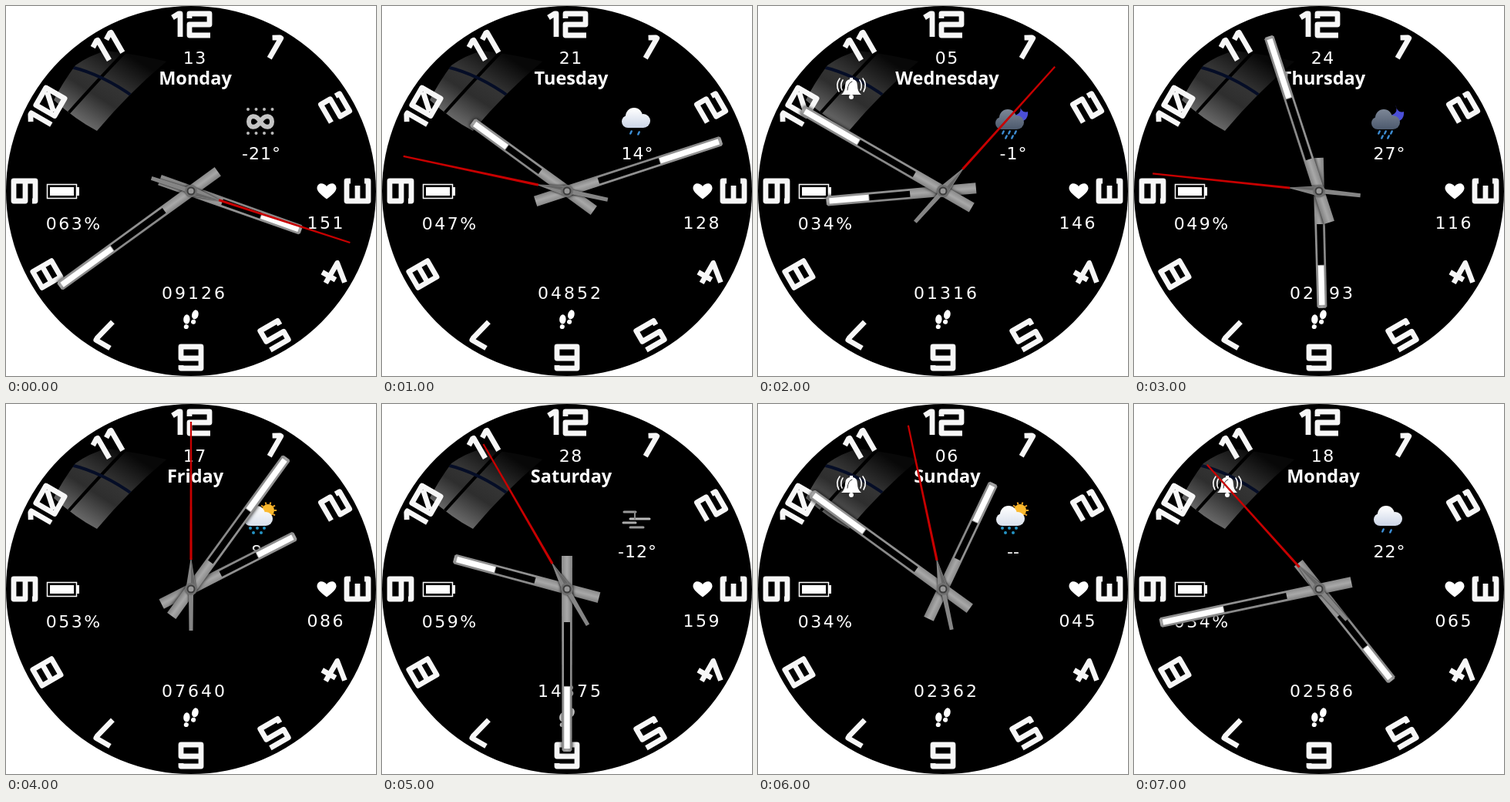
Write an HTML page with a canvas that moves like this. It is 480 px wide and 480 px high and loops after 8 s.

```html
<!DOCTYPE html>
<html lang="en">
<head>
<meta charset="utf-8">
<title>Watch face</title>
<style>
  html, body { margin: 0; width: 100%; height: 100%; overflow: hidden; background: #fff; }
  canvas { display: block; width: 480px; height: 480px; }
</style>
</head>
<body>
<canvas id="face" width="480" height="480"></canvas>
<script>
const ctx = document.getElementById('face').getContext('2d');
const TAU = Math.PI * 2;
const STEP = 1000;

const readings = [
  { day: 'Monday', date: '13', time: [3, 39, 18], battery: '063', pulse: '151', steps: '09126', temp: '-21°', sky: 'haze' },
  { day: 'Tuesday', date: '21', time: [10, 12, 47], battery: '047', pulse: '128', steps: '04852', temp: '14°', sky: 'rain' },
  { day: 'Wednesday', date: '05', time: [8, 50, 7], battery: '034', pulse: '146', steps: '01316', temp: '-1°', sky: 'nightRain', alarm: true },
  { day: 'Thursday', date: '24', time: [5, 57, 46], battery: '049', pulse: '116', steps: '02393', temp: '27°', sky: 'nightRain' },
  { day: 'Friday', date: '17', time: [2, 6, 0], battery: '053', pulse: '086', steps: '07640', temp: '8°', sky: 'sunSnow' },
  { day: 'Saturday', date: '28', time: [9, 30, 55], battery: '059', pulse: '159', steps: '14375', temp: '-12°', sky: 'fog' },
  { day: 'Sunday', date: '06', time: [0, 51, 58], battery: '034', pulse: '045', steps: '02362', temp: '--', sky: 'sunSnow', alarm: true },
  { day: 'Monday', date: '18', time: [4, 43, 53], battery: '034', pulse: '065', steps: '02586', temp: '22°', sky: 'rain', alarm: true }
];

// Square numerals as SVG paths, each about 27 by 28 units around its centre.
const numerals = {
  0: 'M-13-14H13V14H-13ZM-9 10L9-10',
  1: 'M-8-9L0-14H2V16',
  2: 'M-13-8V-14H13V0H-13V14H14',
  3: 'M-13-9V-14H13V14H-13V9M-7 0H13',
  4: 'M3-16L-14 5H16M6-4V16',
  5: 'M14-14H-13V-2H13V14H-13V8',
  6: 'M13-10V-14H-13V14H13V-1H-13',
  7: 'M-11-13H10V-10L3 18',
  8: 'M-12-14H12V14H-12ZM-14 0H14',
  9: 'M-13 10V14H13V-14H-13V1H13'
};
const pairOffsets = { 10: [-18, 9], 11: [-9, 11], 12: [-16, 11] };

function at(x, y, angle, draw) {
  ctx.save();
  ctx.translate(x, y);
  ctx.rotate(angle);
  draw();
  ctx.restore();
}

function disc(x, y, r, color) {
  ctx.fillStyle = color;
  ctx.beginPath();
  ctx.arc(x, y, r, 0, TAU);
  ctx.fill();
}

function line(color, width, ...points) {
  ctx.strokeStyle = color;
  ctx.lineWidth = width;
  ctx.beginPath();
  points.forEach(([x, y]) => ctx.lineTo(x, y));
  ctx.stroke();
}

function shape(color, d) {
  ctx.fillStyle = color;
  ctx.fill(new Path2D(d));
}

function outline(color, width, d) {
  ctx.strokeStyle = color;
  ctx.lineWidth = width;
  ctx.stroke(new Path2D(d));
}

function label(text, x, y, font, spacing = 0) {
  ctx.font = font;
  ctx.letterSpacing = spacing + 'px';
  ctx.textAlign = 'center';
  ctx.fillStyle = '#fff';
  ctx.fillText(text, x + spacing / 2, y);
}

function drawGlass() {
  const panel = new Path2D('M62 122Q73 100 90 77Q108 64 130 58Q172 63 208 72Q160 112 118 162Q91 148 62 122Z');
  const shade = ctx.createLinearGradient(100, 158, 160, 64);
  shade.addColorStop(0, '#707070');
  shade.addColorStop(.4, '#2e2e2e');
  shade.addColorStop(.6, '#343434');
  shade.addColorStop(1, '#080808');
  ctx.save();
  ctx.clip(panel);
  ctx.fillStyle = shade;
  ctx.fillRect(55, 50, 160, 120);
  outline('#000', 4, 'M154 60Q123 92 80 140');
  outline('#050d26', 4, 'M84 79Q126 89 167 119');
  ctx.restore();
}

function drawNumerals() {
  ctx.lineJoin = 'round';
  for (let hour = 1; hour <= 12; hour++) {
    at(240, 240, hour * TAU / 12, () => {
      ctx.translate(0, -216);
      const offsets = pairOffsets[hour] || [0];
      [...String(hour)].forEach((digit, i) => {
        ctx.save();
        ctx.translate(offsets[i], 0);
        outline('#f7f7f7', 6.8, numerals[digit]);
        ctx.restore();
      });
    });
  }
  ctx.lineJoin = 'miter';
}

function drawBattery() {
  ctx.strokeStyle = '#fff';
  ctx.lineWidth = 1.5;
  ctx.strokeRect(53.5, 231.5, 38, 18);
  ctx.fillStyle = '#fff';
  ctx.fillRect(57, 235, 31, 11);
  ctx.fillRect(92, 235, 3, 11);
}

function drawHeart() {
  shape('#fff', 'M416 250.5Q403 241 403.5 236C404 229 412 228.5 416 234C420 228.5 428 229 428.5 236Q429 241 416 250.5Z');
}

function drawFoot(x, y, side) {
  at(x, y, .15, () => {
    ctx.scale(side * .88, .88);
    ctx.fillStyle = '#fff';
    ctx.beginPath();
    ctx.ellipse(0, -3, 4.8, 7, -.1, 0, TAU);
    ctx.fill();
    ctx.beginPath();
    ctx.ellipse(1, 8, 3.5, 3.4, 0, 0, TAU);
    ctx.fill();
  });
}

function drawBell() {
  ctx.lineCap = 'round';
  shape('#fff', 'M108 115Q113 111 113 104Q113 96 119 95V93H123V95Q129 96 129 104Q129 111 134 115Z');
  outline('#333', 1, 'M116 109Q117 99 122 98');
  disc(121, 118, 3, '#fff');
  for (const side of [-1, 1]) {
    at(121, 105, 0, () => {
      ctx.scale(side, 1);
      outline('#fff', 1.6, 'M11-9Q15-3 12 4M15-11Q21-3 16 6');
    });
  }
  ctx.lineCap = 'butt';
}

function cloud(x, y, top, bottom) {
  const fill = ctx.createLinearGradient(0, y - 14, 0, y + 12);
  fill.addColorStop(0, top);
  fill.addColorStop(1, bottom);
  disc(x - 10, y + 3, 8, fill);
  disc(x - 2, y - 4, 11, fill);
  disc(x + 10, y + 2, 9, fill);
  ctx.fillRect(x - 10, y + 2, 20, 9);
}

function drops(color, points) {
  ctx.lineCap = 'round';
  points.forEach(([x, y]) => line(color, 2.5, [x + .7, y - 1.5], [x - .7, y + 1.5]));
  ctx.lineCap = 'butt';
}

const skies = {
  haze() {
    for (const x of [314, 324.5, 335, 345.5])
      for (const y of [134, 165]) disc(x, y, 2, '#bbb');
    outline('#c4c4c4', 6, 'M330 150C324 140 315 142 315 150S324 160 330 150S345 142 345 150S336 160 330 150Z');
  },
  rain() {
    cloud(329, 147, '#fff', '#c9d3e6');
    drops('#3d8fd6', [[323, 164], [333, 165]]);
  },
  nightRain() {
    shape('#4b4fd8', 'M339 128Q345 140 329 143Q336 154 346 148Q351 144 350 137Q342 140 339 128Z');
    cloud(326, 149, '#7b8595', '#4b586c');
    drops('#3c8bd0', [[318, 164], [326, 164], [334, 164], [322, 170], [330, 170]]);
  },
  fog() {
    ctx.lineCap = 'round';
    line('#999', 3, [314, 140], [329, 140]);
    line('#bbb', 3, [322, 149], [347, 149]);
    line('#aaa', 3, [313, 154], [329, 154]);
    line('#999', 3, [322, 160], [339, 160]);
    line('#888', 2, [328, 140], [328, 149]);
    ctx.lineCap = 'butt';
  },
  sunSnow() {
    for (let i = 0; i < 10; i++)
      at(340, 138, i * TAU / 10, () => line('#f5a623', 2, [8, 0], [11, 0]));
    disc(340, 138, 8, '#fbb92e');
    cloud(327, 147, '#fff', '#d8dfeb');
    for (const [x, y] of [[317, 161], [326, 161], [335, 161], [321, 167], [331, 167]])
      disc(x, y, 2, '#2494c4');
  }
};

function drawHand(turn, split, tip) {
  at(240, 240, turn * TAU, () => {
    const metal = ctx.createLinearGradient(-7, 0, 7, 0);
    metal.addColorStop(0, '#808080');
    metal.addColorStop(.5, '#a8a8a8');
    metal.addColorStop(1, '#8a8a8a');
    ctx.save();
    ctx.shadowColor = '#000';
    ctx.shadowBlur = 5;
    shape(metal, `M-7 43H7L6.5 ${2 - tip}L4.5 ${-tip}H-4.5L-6.5 ${2 - tip}Z`);
    ctx.restore();
    ctx.fillStyle = '#000';
    ctx.fillRect(-4, -split, 8, split - 43);
    ctx.fillStyle = '#fff';
    ctx.fillRect(-3.7, 4 - tip, 7.4, tip - split - 5);
  });
}

function drawSecondHand(turn) {
  at(240, 240, turn * TAU, () => {
    ctx.save();
    ctx.shadowColor = '#000';
    ctx.shadowBlur = 3;
    shape('#858585', 'M-2.5 54H2.5L3 8L7 2L0-42L-7 2L-3 8Z');
    ctx.restore();
    shape('#666', 'M0-40L6 2H0Z');
    shape('#c80000', 'M-1.6-38H1.6L1.1-217H-1.1Z');
  });
  disc(240, 240, 8, '#707070');
  disc(240, 240, 5.5, '#3c3c3c');
  disc(240, 240, 3.5, '#999');
}

function drawFace(now) {
  const r = readings[Math.floor(now / STEP) % readings.length];
  const [h, m, s] = r.time;
  const digits = '22px "DejaVu Sans", sans-serif';

  ctx.fillStyle = '#fff';
  ctx.fillRect(0, 0, 480, 480);
  disc(240, 240, 240, '#000');
  drawGlass();
  drawNumerals();
  drawBattery();
  drawHeart();
  drawFoot(234, 409, 1);
  drawFoot(245, 403, -1);
  if (r.alarm) drawBell();
  skies[r.sky]();

  label(r.date, 244.5, 75, digits, 1.5);
  label(r.day, 245.5, 102, 'bold 23.5px "Open Sans", sans-serif');
  label(r.temp, 331, 199, digits, r.temp === '--' ? 0 : 1);
  label(r.battery + '%', 87, 290, digits, 2.5);
  label(r.pulse, 414, 289, digits, 2.5);
  label(r.steps, 243, 380, digits, 3);

  drawHand((h + m / 60) / 12, 96, 152);
  drawHand(m / 60, 126, 211);
  drawSecondHand(s / 60);
}

const start = performance.now();
function tick() {
  drawFace(performance.now() - start);
  requestAnimationFrame(tick);
}
tick();
</script>
</body>
</html>
```
